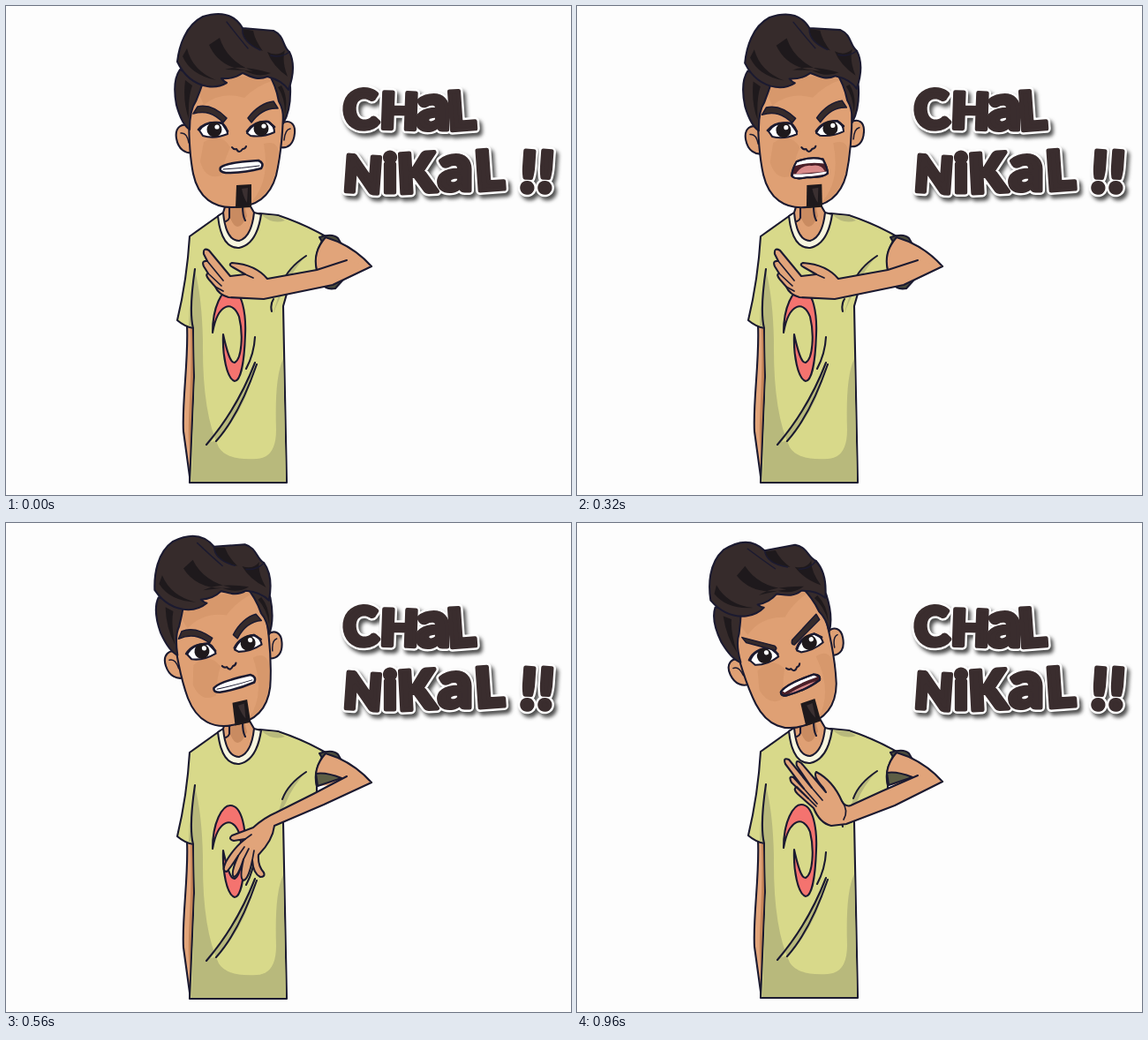
An HTML page for the animation above (1.04 s loop, 640 by 554 pixels).

```html
<!DOCTYPE html>
<html lang="en">
<head>
<meta charset="utf-8">
<title>Chal nikal</title>
<style>
  html, body { margin: 0; height: 100%; overflow: hidden; background: #fdfdfd; }
  svg { display: block; width: 100%; height: 100%; }
  .ln { fill: none; }
  .skin { fill: #e1a47a; }
  .face { fill: #dfa074; }
  .hair { fill: #362b2b; }
  .dark { fill: #1e191c; stroke: none; }
  .shade { fill: #b8b97c; stroke: none; }
  .shirt { fill: #d8d98a; }
  .flat { stroke: none; }
  .white { fill: #fff; }
  #lettering { font-family: Lato, Inter, sans-serif; font-weight: 900; text-anchor: middle; filter: drop-shadow(3px 4px 2px #222c); }
</style>
</head>
<body>
<svg viewBox="0 0 640 554" stroke="#1b1a30" stroke-width="2.1" stroke-linejoin="round" stroke-linecap="round">
  <defs><g id="letters"></g></defs>

  <g id="body">
    <path class="skin" d="M205 362C207 400 199 450 201 482L209 540H214V362Z"/>
    <path class="flat" fill="#c58457" d="M209 366C211 420 206 460 207 490L211 539H214V366Z"/>
    <path class="shirt" d="M243 236L208 261Q205 310 194 356Q202 363 212 365L213 420L208 540H318L314 340L318 326L352 308V299Q348 278 362 261Q338 247 308 237L288 235Z"/>
    <path class="shade" d="M214 300Q208 325 207 362L213 364L214 420L210 539H317L314 400Q304 420 306 480Q306 512 284 513Q250 515 241 500Q222 460 223 380Q222 330 214 300ZM340 283Q319 297 313 314L302 350Q310 330 317 318Q324 300 340 283ZM282 404Q276 450 240 492L232 494Q262 450 282 404ZM290 237L308 238L316 243Q302 248 290 237Z"/>
    <path class="ln" d="M214 298Q207 345 212 365M340 283Q319 297 313 314M303 332Q299 338 301 346M282 404Q262 456 227 497M284 406Q264 464 238 493M282 375Q281 394 272 411"/>
    <path fill="#f4736f" d="M234 370C234 340 245 321 254 321C268 321 272 350 271 372C270 402 266 425 259 425C250 422 245 395 246 372C250 390 254 405 259 404C267 400 269 372 264 352C257 333 240 336 234 370Z"/>
    <path fill="#f7f5df" d="M240 238Q244 275 264 274Q284 270 289 236L281 234H246Z"/>
    <path class="face" d="M246 234Q249 266 264 266Q278 262 281 234L270 215H252Z"/>
    <path class="flat" fill="#c98b61" d="M253 226H270L273 238Q262 262 253 238Z"/>
    <path class="ln" d="M253 226V240Q252 243 249 244M268 226Q268 238 271 243"/>

    <path fill="#4c4d3c" d="M355 262Q370 257 376 263L383 275L362 274Z"/>
    <path id="cuff" fill="#4c4d3c" d="M358 314Q362 322 373 320L382 310Z"/>
    <path class="skin" d="M352 299Q347 279 362 262L376 267Q398 277 414 295"/>
    <path id="gap" fill="#5d5e45" d="M351 285L353 299L380 290Q362 283 351 285Z"/>
    <g id="arm" class="skin"></g>
  </g>

  <g id="head">
    <path class="face" d="M211 138C199 130 191 138 193 150C195 162 203 168 213 166ZM312 133C321 128 328 133 327 144C326 156 320 162 310 160Z"/>
    <path class="ln" stroke-width="1.5" d="M198 144Q205 143 207 155M322 139Q316 140 315 152"/>
    <path class="face" d="M212 66L208 95C206 140 208 170 212 190C218 218 236 229 258 228C286 228 300 213 306 192C312 166 315 130 314 90L306 66Z"/>
    <path class="flat" fill="#cb8c60" d="M224 154Q244 142 254 160Q246 178 244 192Q226 198 220 176ZM292 156Q312 150 308 176Q302 214 276 224Q300 200 292 156ZM214 88Q262 74 304 84Q284 90 270 104Q244 96 224 112Z" opacity=".4"/>
    <path class="hair" d="M197 72Q188 85 193 112Q199 134 208 140Q208 118 215 108Q220 96 224 84ZM296 74Q306 90 309 108Q315 118 314 133Q323 118 322 92L319 78Z"/>
    <path class="dark" d="M203 84Q200 108 207 128Q206 104 211 90ZM312 90Q320 104 316 122Q316 104 308 92Z"/>
    <path class="hair" d="M194 63C196 46 203 22 223 12C242 6 258 8 268 25L303 28C316 34 313 46 321 52C328 66 324 84 320 95C314 86 304 82 296 80C284 85 276 79 268 76Q258 83 244 82Q247 86 250 87Q240 93 228 91C212 88 201 78 194 63Z"/>
    <path class="dark" d="M200 57Q209 78 238 84Q211 73 205 48ZM230 44Q242 72 280 74Q250 62 242 36ZM268 26Q268 42 291 51Q282 39 280 28ZM296 52Q302 68 319 80Q312 62 316 50Q308 58 296 52ZM248 72Q266 66 300 76Q286 82 270 73Z"/>
    <path class="ln" stroke-width="1.5" d="M268 25Q266 40 288 50M250 18Q264 36 274 48M321 52Q312 59 300 56"/>

    <path class="white" d="M219 141Q226 130 244 132Q251 137 251 145Q236 151 223 147ZM273 144Q280 131 297 131Q304 135 304 143Q291 149 277 147Z"/>
    <path class="ln" stroke-width="2.6" d="M218 140Q227 129 245 133L251 142M273 142Q281 130 297 131L304 137"/>
    <g class="dark"><circle cx="236" cy="140" r="8.5"/><circle cx="289" cy="139" r="8.5"/></g>
    <g class="white flat"><circle cx="239" cy="137" r="2.6"/><circle cx="292" cy="136" r="2.6"/></g>
    <path id="brows" class="hair" stroke-width="1.5"/>
    <path class="ln" d="M256 160Q258 163 261 162Q264 168 268 162Q271 162 272 159"/>
    <g id="mouth"></g>
    <path class="dark" d="M261 203L278 202V228L260 229Z"/>
    <path class="flat" fill="#3b3031" d="M267 207L274 206L273 223Q269 217 267 207Z"/>
  </g>

  <g id="lettering" transform="translate(-2 0)">
    <use href="#letters" fill="#fff" stroke="#fff" stroke-width="10"/>
    <use href="#letters" fill="#3a2d2e" stroke="#3a2d2e" stroke-width="5"/>
  </g>
</svg>
<script>
const $ = id => document.getElementById(id);
const path = (d, attrs = '') => `<path d="${d}" ${attrs}/>`;

// letter, centre x, baseline, size, tilt
$('letters').innerHTML = [
  ['C', 405, 139, 60, -3], ['H', 447, 139, 56, 2], ['a', 486, 140, 74, 0], ['L', 519, 140, 60, -4],
  ['N', 405, 211, 56, 4], ['i', 437, 211, 60, 0], ['K', 468, 211, 61, -3], ['a', 511, 209, 76, 0],
  ['L', 551, 208, 62, -4], ['!', 592, 211, 64, 4], ['!', 612, 211, 64, 4]
].map(([c, x, y, size, tilt]) =>
  `<text x="${x}" y="${y}" font-size="${size}" transform="rotate(${tilt} ${x} ${y})">${c}</text>`).join('');

const line = 'class="ln" stroke-width="1.7"';
const arms = {
  flat: path('M386 288L352 299L296 309C286 297 270 292 256 291Q251 293 257 296L271 304L254 306L230 277Q223 273 224 281L228 289Q221 288 224 295L229 303Q225 304 230 310L237 318Q241 327 252 330L292 332L370 316L414 295') +
    path('M228 289L246 311M229 303L244 317M237 318L246 323M271 304L280 308', line),
  down: path('M386 288L348 308L306 329Q292 335 280 346L256 355Q251 359 258 361L271 359Q258 369 249 385Q244 396 250 396Q254 392 263 378Q254 398 258 402Q263 401 269 382Q264 404 269 406Q275 404 279 383Q280 398 288 402Q294 402 292 397Q285 389 286 377Q302 361 304 344L360 320L414 295') +
    path('M263 378L270 368M269 382L275 370M279 383L281 372M271 359L278 354', line),
  up: path('M386 288L345 306L310 322Q304 324 300 317Q290 294 271 284Q267 289 279 302L282 307L254 274Q247 269 249 277L266 302L240 270Q233 267 236 275L257 303L245 290Q239 288 243 296L262 314L249 301Q244 303 250 309L268 325Q275 342 288 345L305 343L360 322L414 295') +
    path('M266 302L278 316M257 303L272 320M262 314L271 323M300 317Q308 328 302 338', line)
};

const pit = '#4b2029', tongue = '#d98a8a';
const open = 'M250 177Q266 168 282 174Q289 188 281 196Q265 203 250 197Q243 188 250 177Z';
const half = 'M250 176Q266 170 280 174Q285 184 285 190Q280 195 262 194Q248 197 244 192Q245 184 250 176Z';
const snarl = 'M243 184Q252 177 284 175Q292 177 289 183Q272 190 248 190Q241 189 243 184Z';
const mouths = {
  clench: path('M243 183Q250 177 286 175Q293 178 289 184Q270 189 249 189Q241 188 243 183Z', 'class="white" stroke-width="2.6"') +
    path('M246 185Q266 184 287 181', 'class="ln" stroke-width="1"'),
  open: path(open, `fill="${pit}"`) +
    path('M251 178Q266 170 281 175L281 179Q265 176 250 182Z', 'class="white flat"') +
    path('M250 193Q256 184 266 187Q275 183 282 190Q278 197 264 199Q254 198 250 193Z', `class="flat" fill="${tongue}"`) +
    path('M249 194Q264 200 282 193L280 196Q264 201 251 197Z', 'class="white flat"') + path(open, 'class="ln"'),
  half: path(half, `fill="${pit}"`) +
    path('M250 177Q266 171 279 175L281 179Q264 176 248 181Z', 'class="white flat"') +
    path('M249 190Q256 179 267 181Q278 179 282 188Z', `class="flat" fill="${tongue}"`) +
    path('M246 190Q266 191 284 188L283 191Q264 194 246 194Z', 'class="white flat"') + path(half, 'class="ln"'),
  snarl: path(snarl, `fill="${pit}"`) +
    path('M245 184Q254 178 284 176L287 179Q266 180 247 186Z', 'class="white flat"') +
    path('M250 189Q266 184 284 183Q272 188 250 189Z', `class="flat" fill="${tongue}"`) + path(snarl, 'class="ln"')
};

const brows = [
  'M212 122L217 114C230 111 241 118 250 127L246 132C236 122 226 118 212 122ZM274 127C282 116 293 109 303 108L308 116C296 115 286 121 278 132Z',
  'M217 113L220 120L249 137Q253 136 250 132ZM305 110L307 117L272 137Q268 136 271 131Z'
];

const tilts = [0, -.3, -.6, -1, -1.3, -2.4, -4.2, -9, -15, -15.4, -15.5, -15.5, -15.5];
const speech = 'clench half open open half snarl snarl clench open open half snarl snarl'.split(' ');
const swing = { 5: -3, 6: -7 };
let shown = -1;

function draw(i) {
  const pose = i < 7 ? 'flat' : i == 7 ? 'down' : 'up';
  $('head').setAttribute('transform', `rotate(${tilts[i]} 263 232)`);
  $('body').setAttribute('transform', `translate(0 ${-Math.max(0, Math.min(2, i - 6))})`);
  $('arm').setAttribute('transform', `rotate(${swing[i] || 0} 414 295)`);
  $('arm').innerHTML = arms[pose];
  $('mouth').innerHTML = mouths[speech[i]];
  $('brows').setAttribute('d', brows[+(i > 7)]);
  $('cuff').style.display = i < 6 ? '' : 'none';
  $('gap').style.display = i < 6 ? 'none' : '';
}

function tick() {
  const i = Math.floor(performance.now() % 1040 / 80);
  if (i != shown) draw(shown = i);
  requestAnimationFrame(tick);
}
tick();
</script>
</body>
</html>
```
